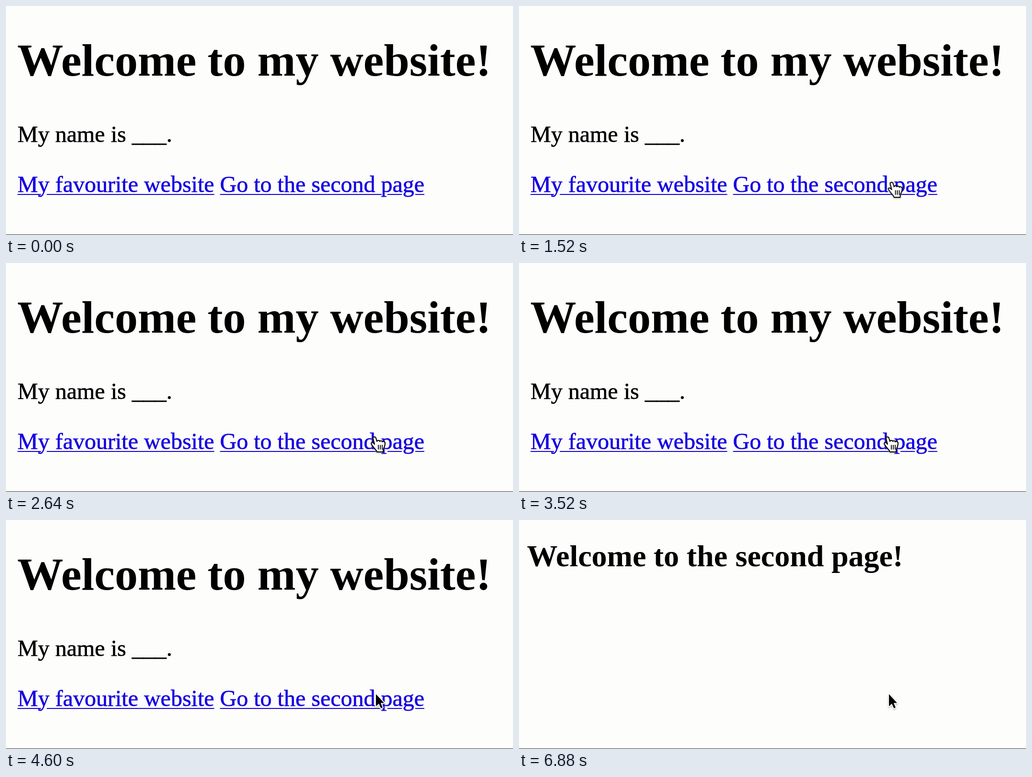
Recreate the animation shown at these times as an HTML page. Size 1058 px wide and 480 px high, loop 8 s.

```html
<!DOCTYPE html>
<html lang="en">
<head>
<meta charset="utf-8">
<title>Following a link</title>
<style>
  html, body { margin: 0; width: 100%; height: 100%; overflow: hidden; background: #fdfdfc; }
  svg { display: block; width: 1058px; height: 480px; }
  text {
    font-family: "Liberation Serif", Times, serif; font-size: 48px; font-kerning: none; white-space: pre;
    stroke: #000; stroke-width: 0.6;
  }
  .title { font-size: 96px; font-weight: bold; stroke: none; }
  .second .title { font-size: 64px; }
  .link { fill: #1400e0; stroke: #1400e0; }
  .underline { stroke: #1400e0; stroke-width: 2; }

  .first, .second, .arrow, .hand { animation: 8s step-end infinite; }
  .first { animation-name: leave; }
  .second { animation-name: enter; }
  .arrow { animation-name: off-link; }
  .hand { animation-name: on-link; }
  .pointer { animation: move 8s linear infinite; filter: drop-shadow(0 2px 1.5px #8888808c); }

  @keyframes leave { 0% { opacity: 1 } 58.75%, 100% { opacity: 0 } }
  @keyframes enter { 0% { opacity: 0 } 58.75%, 100% { opacity: 1 } }

  /* The pointer becomes a hand while it is over the link. */
  @keyframes on-link {
    0%, 23.1% { opacity: 0 }
    17.1%, 27.4% { opacity: 1 }
    56.2%, 100% { opacity: 0 }
  }
  @keyframes off-link {
    0%, 23.1% { opacity: 1 }
    17.1%, 27.4% { opacity: 0 }
    56.2%, 100% { opacity: 1 }
  }
  @keyframes move {
    0%, 12.75% { transform: translate(803px, 490px) }
    13.75% { transform: translate(797px, 466px) }
    19.5% { transform: translate(778px, 360px) }
    26% { transform: translate(771px, 346px) }
    30%, 100% { transform: translate(771px, 364px) }
  }
</style>
</head>
<body>
<svg viewBox="0 0 1058 480">
  <g class="first">
    <text class="title" y="145.5"><tspan x="23.5">W<tspan dx="-4.5">elcome</tspan></tspan> <tspan x="420.5">to</tspan> <tspan x="524.5">my</tspan> <tspan x="676.5">website!</tspan></text>
    <text x="24" y="285">My name is ___.</text>
    <text class="link" x="24" y="390">My favourite website</text>
    <text class="link" x="446.6" y="390">Go to the second page</text>
    <path class="underline" d="M24 395H73M85 395H434.6M446.6 395H784M796 395H826M854 395H873"/>
  </g>

  <g class="second">
    <text class="title" y="97"><tspan x="16.5">W<tspan dx="-3.5">elcome</tspan></tspan> <tspan x="280.8">to</tspan> <tspan x="349.8">the</tspan> <tspan x="451.5">second</tspan> <tspan x="652">page!</tspan></text>
  </g>

  <path d="M0 478.5H1058" stroke="#c6c6c0"/>
  <path d="M0 479.5H1058" stroke="#6c6c68"/>

  <g class="pointer" stroke-linejoin="round" stroke-linecap="round">
    <path class="arrow" d="M1 1V26.5L7 21L11.3 30.5L15 29L10.8 19.4H18Z" stroke="#fff" stroke-width="3.5" paint-order="stroke"/>
    <g class="hand" fill="#fff" stroke="#000" stroke-width="2">
      <path d="M-5 4C-6 0 0-1 1 3L3 10C4 7 8 7 9 10C10 8 14 8 14 11C16 9 20 10 20 14C20 20 17 24 16 27V32H3C3 29-2 25-4 22C-6 19-9 16-9 14C-8 11-5 12-2 16Z"/>
      <path d="M6 18V26M10 18V26M14 18V26" stroke-width="1.8"/>
    </g>
  </g>
</svg>
</body>
</html>
```
